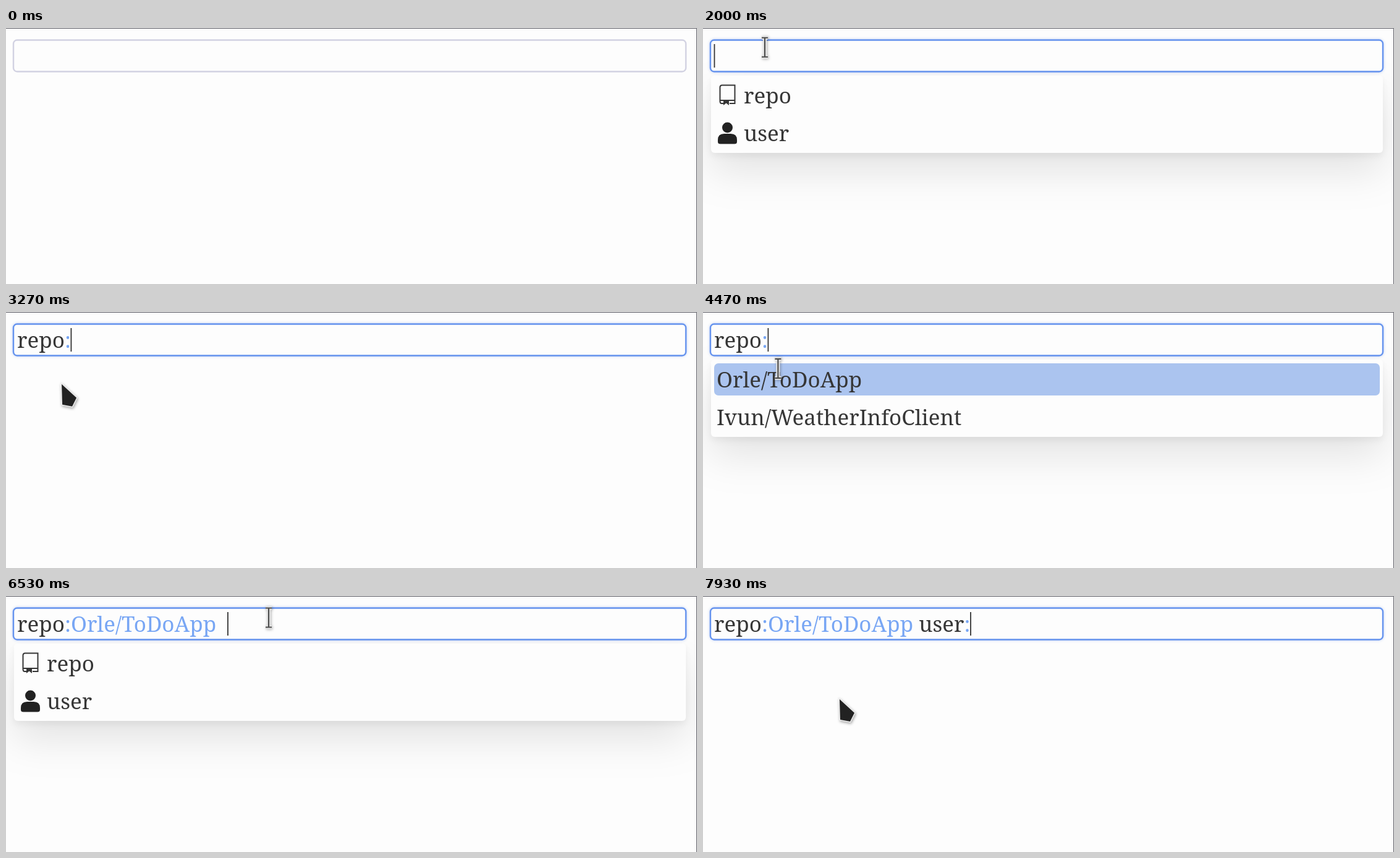
Write an HTML page that moves like this. It is 1118 by 414 pixels and loops after 8 s.

```html
<!DOCTYPE html>
<html lang="en">
<head>
<meta charset="utf-8">
<title>Search filter box</title>
<style>
  html, body { margin: 0; width: 100%; height: 100%; overflow: hidden; background: #fdfdfd; }
  svg { display: block; width: 1118px; height: 414px; }
  text { font: 35px "Noto Serif", serif; fill: #363636; white-space: pre; }
  .value { fill: #78a6f4; }
  #panelBox { fill: #fdfdfd; filter: drop-shadow(0 30px 32px rgba(0, 0, 0, .1)) drop-shadow(0 5px 6px rgba(0, 0, 0, .06)); }
  #field { fill: #fdfdfd; stroke: #d2d2e2; stroke-width: 2.4; }
  #field.focus { stroke: #6593ee; filter: drop-shadow(0 0 2px rgba(100, 140, 230, .4)); }
  #mark { fill: #abc4ef; }
  #arrow { fill: #222; stroke: #eee; stroke-width: 3; paint-order: stroke; filter: drop-shadow(1px 2px 2px rgba(0, 0, 0, .35)); }
  #beam { fill: none; stroke: #4c4c4c; stroke-width: 2.2; filter: drop-shadow(1px 1px 2px rgba(0, 0, 0, .3)); }
  #beam .halo { stroke: #e6e6e6; stroke-width: 6; }
</style>
</head>
<body>
<svg viewBox="0 0 1118 414">
  <g id="panel">
    <rect id="panelBox" x="13" y="77" width="1087" height="125" rx="6"/>
    <rect id="mark" x="18" width="1077" height="52" rx="7"/>
    <g id="kinds">
      <path d="M33 122H30Q27.500 122 27.500 118V96Q27.500 92.500 31 92.500H51.500V122H43M28 117H51.500" fill="none" stroke="#363636" stroke-width="2"/>
      <path d="M33 118H42V125L37.500 121.500L33 125Z" fill="#363636"/>
      <g fill="#222">
        <circle cx="39.500" cy="161" r="8.500"/>
        <path d="M24 184V181Q24 171 34 171H45Q55 171 55 181V184Q55 187.500 51 187.500H28Q24 187.500 24 184Z"/>
      </g>
      <text x="66" y="122">repo</text>
      <text x="66" y="183">user</text>
    </g>
    <g id="repos">
      <text x="22" y="122">Orle/ToDoApp</text>
      <text x="22" y="183">Ivun/WeatherInfoClient</text>
    </g>
  </g>
  <rect id="field" x="12" y="19.500" width="1088" height="51" rx="6"/>
  <text id="query" x="18" y="58"></text>
  <path id="caret" d="M18.500 26V64" stroke="#333" stroke-width="1.800"/>
  <g id="cursor">
    <path id="arrow" d="M0 0L24 22L17 36L1 33Z"/>
    <g id="beam">
      <path class="halo" d="M-5-15.500H5M0-15.500V15.500M-5 15.500H5"/>
      <path d="M-5-15.500H5M0-15.500V15.500M-5 15.500H5"/>
    </g>
  </g>
  <path d="M0 .5H1117.500V414" fill="none" stroke="#5c5c64"/>
</svg>
<script>
const LOOP = 8000, FADE = 130, ROW = 61;
const el = id => document.getElementById(id);
const show = (id, on) => el(id).style.display = on ? '' : 'none';

// what the field holds and which list is open, from a time on
const stages = [
  { at: 0, query: '' },
  { at: 1730, query: '', list: 'kinds' },
  { at: 2600, query: 'repo:' },
  { at: 4070, query: 'repo:', list: 'repos' },
  { at: 5000, query: 'repo:Orle/ToDoApp ' },
  { at: 6470, query: 'repo:Orle/ToDoApp  ', list: 'kinds' },
  { at: 7330, query: 'repo:Orle/ToDoApp user:' }
];

// pointer strokes, resting in between
const strokes = [
  { from: 1070, to: 1130, x: 146, y: 212 },
  { from: 1210, to: 1470, x: 100, y: 31 },
  { from: 2000, to: 2530, x: 97, y: 128 },
  { from: 2600, to: 3000, x: 90, y: 117 },
  { from: 3270, to: 3730, x: 113, y: 37 },
  { from: 4270, to: 4730, x: 128, y: 134 },
  { from: 5610, to: 6130, x: 425, y: 35 },
  { from: 6600, to: 7270, x: 232, y: 153 },
  { from: 7400, to: 7930, x: 221, y: 167 }
];

function pointerAt(t) {
  let x = 480, y = 398;
  for (const s of strokes) {
    const p = Math.max(0, Math.min(1, (t - s.from) / (s.to - s.from)));
    const eased = p * (1.5 - p / 2);
    x += (s.x - x) * eased;
    y += (s.y - y) * eased;
  }
  return [x, y];
}

// keys stay dark, everything from the colon on is a value
const colored = query => query.replace(/:\S*\s*/g, '<tspan class="value">$&</tspan>');

function draw(t) {
  const [x, y] = pointerAt(t);
  show('cursor', t >= 1070);
  el('cursor').setAttribute('transform', `translate(${x} ${y})`);
  show('beam', y < 93);
  show('arrow', y >= 93);

  const i = stages.findLastIndex(s => t >= s.at);
  const { at, query, list } = stages[i];
  const shown = list || stages[i - 1]?.list;
  const opacity = list ? 1 : Math.max(0, 1 - (t - at) / FADE);
  show('panel', shown && opacity > 0);
  el('panel').style.opacity = opacity;
  show('kinds', shown === 'kinds');
  show('repos', shown === 'repos');

  const row = Math.floor((y - 80) / ROW);
  show('mark', row === 0 || row === 1);
  el('mark').setAttribute('y', 83 + row * ROW);

  el('field').classList.toggle('focus', i > 0);
  el('query').innerHTML = colored(query);
  show('caret', i > 0);
  const width = query ? el('query').getComputedTextLength() : 0;
  el('caret').setAttribute('transform', `translate(${width} 0)`);
}

const start = performance.now();
function tick() {
  draw((performance.now() - start) % LOOP);
  requestAnimationFrame(tick);
}
tick();
</script>
</body>
</html>
```
